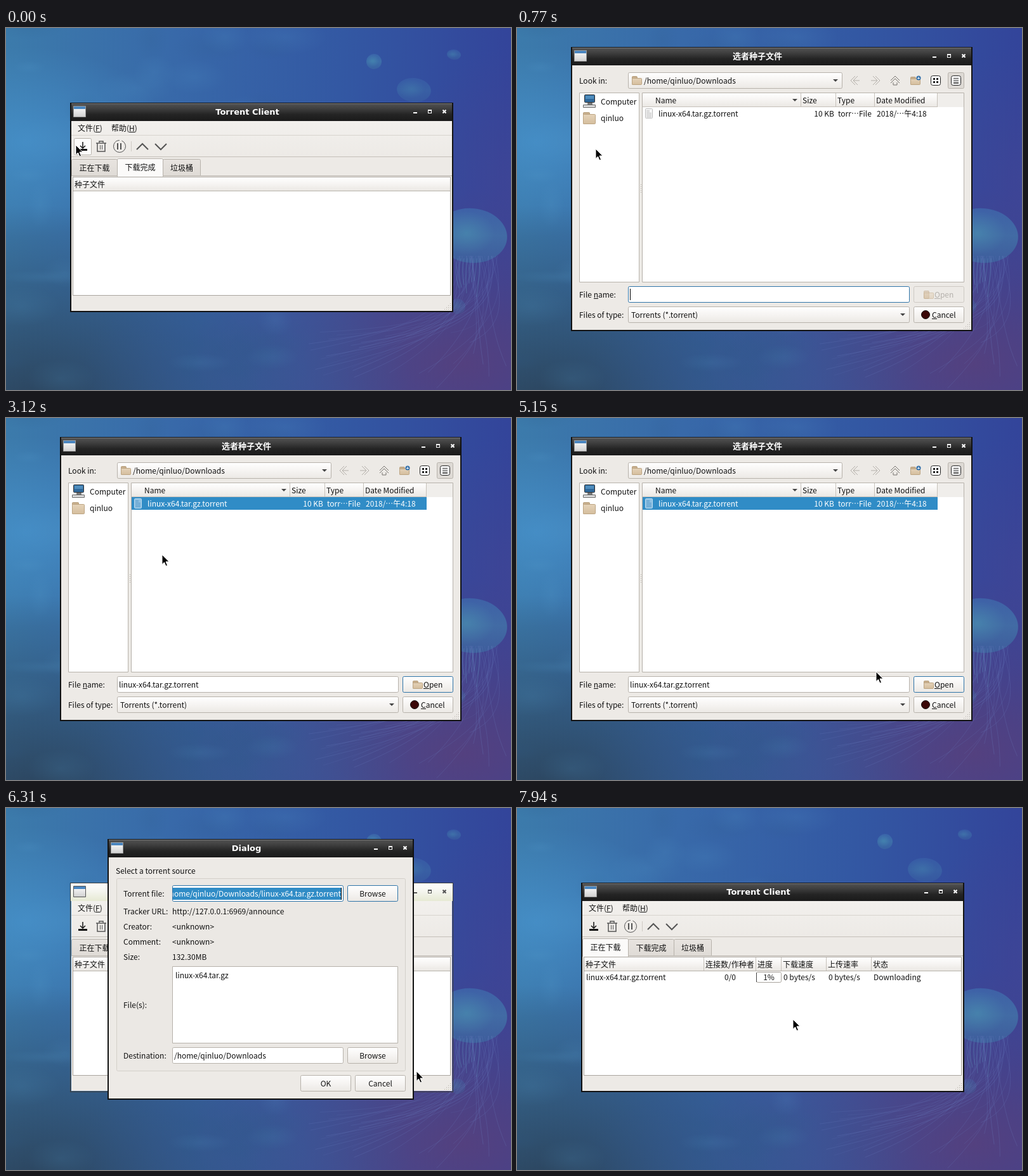
Write an HTML page with a canvas that moves like this. It is 796 by 572 pixels and loops after 8000 ms.

```html
<!DOCTYPE html>
<html lang="zh">
<head>
<meta charset="utf-8">
<title>Torrent Client</title>
<style>
  html, body { margin: 0; width: 100%; height: 100%; overflow: hidden; }
  canvas { display: block; }
</style>
</head>
<body>
<canvas id="stage" width="796" height="572"></canvas>
<script>
const LOOP = 8000, W = 796, H = 572;
const UI_FONT = '12px "Noto Sans CJK SC", sans-serif';
const TITLE_FONT = 'bold 13px "DejaVu Sans", "Noto Sans CJK SC", sans-serif';
const BG = '#edeae6', EDGE = '#b7b2ab', BLUE = '#308cc6', FOCUS = '#2f74a8';
const HOME = '/home/qinluo/Downloads', FILE = 'linux-x64.tar.gz.torrent';
const screen = document.getElementById('stage').getContext('2d');
let ctx = screen;

// ---- drawing helpers ----
function grad(y, h, ...colors) {
  const g = ctx.createLinearGradient(0, y, 0, y + h);
  colors.forEach((c, i) => g.addColorStop(i / (colors.length - 1), c));
  return g;
}
function rect(x, y, w, h, fill) {
  ctx.fillStyle = fill;
  ctx.fillRect(x, y, w, h);
}
function panel(x, y, w, h, fill, edge = EDGE, r = 0) {
  ctx.beginPath();
  ctx.roundRect(x + .5, y + .5, w - 1, h - 1, r);
  ctx.fillStyle = fill;
  ctx.fill();
  ctx.lineWidth = 1;
  ctx.strokeStyle = edge;
  ctx.stroke();
}
function path(points, color, width = 1, fill) {
  ctx.beginPath();
  for (let i = 0; i < points.length; i += 2) ctx.lineTo(points[i], points[i + 1]);
  if (fill) { ctx.closePath(); ctx.fillStyle = fill; ctx.fill(); }
  ctx.lineWidth = width;
  ctx.strokeStyle = color;
  ctx.stroke();
}
// y is the middle of the line; "&" underlines the next letter
function text(s, x, y, color = '#111', align = 'left', font = UI_FONT) {
  const mark = s.indexOf('&'), plain = s.replace('&', '');
  ctx.font = font;
  ctx.textAlign = align;
  ctx.fillStyle = color;
  ctx.fillText(plain, x, y + 5);
  if (mark >= 0) {
    const from = ctx.measureText(plain.slice(0, mark)).width;
    rect(Math.round(x + from), y + 6, Math.round(ctx.measureText(plain[mark]).width), 1, color);
  }
}
function clipped(x, y, w, h, draw) {
  ctx.save();
  ctx.beginPath();
  ctx.rect(x, y, w, h);
  ctx.clip();
  draw();
  ctx.restore();
}
const face = (y, h) => grad(y, h, '#ffffff', '#f6f4f2', '#ebe8e4');
function button(x, y, w, label, edge) {
  panel(x, y, w, 26, face(y, 26), edge, 2);
  text(label, x + w / 2, y + 13, '#111', 'center');
}
function field(x, y, w, edge) { panel(x, y, w, 26, '#fff', edge, 2); }
function combo(x, y, w) {
  panel(x, y, w, 26, face(y, 26), EDGE, 2);
  downArrow(x + w - 11, y + 13);
}
function downArrow(x, y) { path([x - 4, y - 2, x + 4, y - 2, x, y + 2], 'transparent', 1, '#444'); }
function folder(x, y, w, h, alpha = 1) {
  ctx.globalAlpha = alpha;
  panel(x, y, w * .55, h, '#c9b08e', '#b59c7a', 1);
  panel(x, y + 3, w, h - 3, grad(y, h, '#e9d8c0', '#d4bd9c'), '#bca482', 1);
  ctx.globalAlpha = 1;
}
function grip(x, y) {
  for (let r = 0; r < 4; r++)
    for (let c = 0; c <= r; c++) rect(x - c * 3, y - 9 + r * 3, 1, 1, '#b5b0a9');
}

// ---- wallpaper ----
function paintWallpaper() {
  let seed = 7;
  const rnd = () => (seed = seed * 16807 % 2147483647) / 2147483647;
  const glow = (x, y, rx, ry, color, alpha) => {
    ctx.save();
    ctx.translate(x, y);
    ctx.scale(rx, ry);
    const g = ctx.createRadialGradient(0, 0, 0, 0, 0, 1);
    g.addColorStop(0, color);
    g.addColorStop(1, color + '00');
    ctx.globalAlpha = alpha;
    rect(-1, -1, 2, 2, g);
    ctx.restore();
  };
  const base = ctx.createLinearGradient(0, 0, W, 60);
  ['#3c7bab', '#3869a9', '#3358a3', '#33449a'].forEach((c, i) => base.addColorStop(i / 3, c));
  rect(0, 0, W, H, base);
  glow(30, 180, 230, 150, '#4a9ad6', .6);
  glow(40, 610, 440, 330, '#2a3f55', .95);
  glow(720, 530, 430, 280, '#57407c', .9);
  glow(380, 540, 260, 150, '#345a94', .55);
  glow(796, 250, 170, 220, '#444593', .6);
  for (let i = 0; i < 60; i++)
    glow(rnd() * 460, rnd() * H, 20 + rnd() * 60, 10 + rnd() * 30, i % 2 ? '#58a0d0' : '#2d5a88', .13);

  const bell = (x, y, rx, ry, alpha) => {
    ctx.globalAlpha = alpha;
    ctx.beginPath();
    ctx.ellipse(x, y, rx, ry, .1, 0, 7);
    ctx.fillStyle = grad(y - ry, ry * 2, '#3f70b0', '#4380ae', '#3c6aa2');
    ctx.fill();
    ctx.globalAlpha = 1;
    glow(x - rx * .15, y - ry * .1, rx * .8, ry * .8, '#4d9bb4', alpha * .7);
  };
  bell(734, 328, 56, 43, .65);
  bell(580, 53, 12, 12, .6);
  bell(706, 42, 11, 8, .4);
  bell(643, 98, 27, 19, .35);
  bell(712, 440, 12, 12, .25);

  ctx.lineWidth = 1;
  for (let i = 0; i < 30; i++) {
    const x = 700 + rnd() * 75, end = 470 + rnd() * 330;
    ctx.strokeStyle = `rgba(105,125,190,${.1 + rnd() * .2})`;
    ctx.beginPath();
    ctx.moveTo(x, 360);
    ctx.bezierCurveTo(x + rnd() * 40 - 20, 420, x + rnd() * 90 - 50, 470, end, 480 + rnd() * 90);
    ctx.stroke();
  }
  for (let i = 0; i < 8; i++) {
    ctx.strokeStyle = '#5f93bc66';
    ctx.beginPath();
    ctx.moveTo(712 + i * 5, 364);
    ctx.quadraticCurveTo(705 + i * 6, 385, 714 + i * 4, 400 + rnd() * 30);
    ctx.stroke();
  }
}
const wallpaper = document.createElement('canvas');
wallpaper.width = W;
wallpaper.height = H;
ctx = wallpaper.getContext('2d');
paintWallpaper();
ctx = screen;

// ---- window frame ----
function frame(x, y, w, h, title, active = true) {
  const b = active ? 2 : 1, ink = active ? '#fff' : '#555', right = x + w, mid = y + 14;
  ctx.lineWidth = b;
  ctx.strokeStyle = active ? '#121212' : '#3c3e3c';
  ctx.strokeRect(x + b / 2, y + b / 2, w - b, h - b);
  rect(x + b, y + 1, w - 2 * b, 28, active
    ? grad(y, 28, '#555', '#3f3f3f', '#242424', '#1b1b1b') : grad(y, 28, '#fff', '#f4f5ee', '#e7ead5'));
  if (active) rect(x + b, y + 1, w - 2 * b, 1, '#777');
  panel(x + 5, y + 5, 20, 18, grad(y + 5, 18, '#fff', '#cfcfcf'), active ? '#999' : '#555');
  rect(x + 6, y + 6, 18, 4, '#4a86c0');
  text(title, x + w / 2 - 22.5, mid, active ? '#fff' : '#717671', 'center', TITLE_FONT);
  rect(right - 63, mid + 1, 6, 2, ink);
  ctx.strokeStyle = ink;
  ctx.lineWidth = 1;
  ctx.strokeRect(right - 39.5, mid - 2.5, 5, 5);
  rect(right - 40, mid - 3, 6, 2, ink);
  const cx = right - 14;
  path([cx - 2.5, mid - 2.5, cx + 2.5, mid + 2.5], ink, 2);
  path([cx + 2.5, mid - 2.5, cx - 2.5, mid + 2.5], ink, 2);
}

// ---- main window ----
function mainFrame(active) { frame(101, 118, 604, 331, 'Torrent Client', active); }

function mainClient(t) {
  const downloading = t >= 7640, ink = '#555';
  rect(103, 147, 600, 300, BG);
  rect(103, 147, 600, 56, grad(147, 56, '#f2f0ed', '#edeae6'));
  text('文件(&F)', 113, 158);
  text('帮助(&H)', 166, 158);
  rect(103, 169, 600, 1, '#d8d4ce');
  rect(103, 203, 600, 1, '#c5c0b9');

  if (t < 80 || (t >= 310 && t < 690)) panel(107, 174, 28, 27, t >= 540 ? '#dedad5' : '#fdfdfc', EDGE, 2);
  path([121, 180, 121, 189], '#111', 1.5);
  path([117, 186, 121, 190, 125, 186], '#111', 1.5);
  rect(114, 191, 14, 3, '#111');
  path([142, 182, 158, 182], ink, 1.5);
  path([147, 181, 147, 179, 153, 179, 153, 181], ink, 1.5);
  path([144, 182, 144, 195, 156, 195, 156, 182], ink, 1.5);
  path([148.5, 185, 148.5, 192], ink);
  path([151.5, 185, 151.5, 192], ink);
  ctx.beginPath();
  ctx.arc(179, 187, 9.5, -1.2, 4.7);
  ctx.stroke();
  rect(175, 182, 2, 10, ink);
  rect(180, 182, 2, 10, ink);
  rect(197, 179, 1, 16, '#cfcac4');
  path([206, 192, 215, 183, 224, 192], ink, 2);
  path([235, 183, 244, 192, 253, 183], ink, 2);

  const selected = downloading ? 0 : 1;
  rect(103, 233, 600, 1, EDGE);
  [['正在下载', 103, 73], ['下载完成', 175, 73], ['垃圾桶', 247, 60]].forEach(([label, x, w], i) => {
    const on = i === selected, top = on ? 206 : 207;
    panel(x, top, w, 235 - top - (on ? 0 : 1), on ? '#fbfaf9' : grad(207, 27, '#e8e4e0', '#dfdbd6'), EDGE, [2, 2, 0, 0]);
    if (on) rect(x + 1, 233, w - 2, 2, '#fbfaf9');
    text(label, x + w / 2, on ? 220 : 221, '#111', 'center');
  });

  panel(105, 235, 596, 188, '#fff', '#aaa59e');
  rect(106, 236, 594, 21, face(236, 21));
  rect(106, 257, 594, 1, EDGE);
  text('种子文件', 108, 247);
  if (downloading) {
    [['连接数/作种者', 297], ['进度', 379], ['下载速度', 419], ['上传速率', 490], ['状态', 561]].forEach(([label, x]) => {
      rect(x - 3, 236, 1, 21, '#c6c1ba');
      text(label, x, 247);
    });
    const done = t >= 7940;
    text(FILE, 109, 267);
    text('0/0', 336, 267, '#111', 'center');
    panel(377, 259, 40, 17, '#fff', '#a9a49d', 2);
    if (done) rect(377, 260, 1, 15, '#444');
    text(done ? '1%' : '0%', 397, 267, '#111', 'center');
    text('0 bytes/s', 420, 267);
    text('0 bytes/s', 491, 267);
    text('Downloading', 562, 267);
  }
  grip(700, 444);
}

// ---- file chooser ----
function chooserFrame() { frame(85, 30, 633, 449, '选者种子文件'); }

function chooserClient(t) {
  const chosen = t >= 1620, nav = '#b3afa9';
  rect(87, 59, 629, 418, BG);
  text('Look in:', 98, 83);
  combo(175, 70, 338);
  folder(181, 76, 16, 14);
  text(HOME, 200, 83);

  [[533, -1, 0], [565, 1, 0], [596, 0, -1]].forEach(([x, dx, dy]) => {
    const color = dy ? '#77736e' : nav;
    const chevron = k => dy ? [x - 7, 83 + k, x, 76 + k, x + 7, 83 + k]
      : [x - dx * k, 76, x + dx * (7 - k), 83, x - dx * k, 90];
    path(chevron(0), color);
    path(chevron(4), color);
    if (dy) path([x - 3, 86, x - 3, 90, x + 3, 90, x + 3, 86], color);
    else path([x + dx * 3, 83, x - dx * 7, 83], color);
  });
  folder(620, 77, 16, 13);
  ctx.beginPath();
  ctx.arc(633, 79, 3.5, 0, 7);
  ctx.fillStyle = '#2d6ca8';
  ctx.fill();
  rect(631, 79, 4, 1, '#fff');
  rect(632.5, 77, 1, 4, '#fff');
  panel(679, 70, 26, 26, '#dedad5', EDGE, 2);
  [652, 684].forEach(x => panel(x, 75, 16, 16, '#fff', '#222', 3));
  for (const x of [656, 661]) for (const y of [79, 84]) rect(x, y, 3, 3, '#222');
  for (const y of [79, 82, 85, 87]) rect(688, y, 8, 1, '#222');

  panel(98, 102, 95, 300, '#fff');
  panel(106, 105, 17, 13, '#30699b', '#333', 1);
  rect(108, 107, 13, 5, '#4f8dbd');
  rect(111, 118, 8, 3, '#777');
  panel(104, 121, 20, 5, '#ddd', '#666');
  text('Computer', 132, 116);
  folder(104, 133, 20, 19);
  text('qinluo', 132, 142);
  for (let y = 247; y < 260; y += 3) rect(195, y, 1, 1, '#aaa59e');

  panel(197, 102, 508, 300, '#fff');
  rect(198, 103, 506, 22, '#f0eeeb');
  rect(198, 103, 465, 21, face(103, 21));
  rect(198, 124, 465, 1, '#c6c1ba');
  [447, 502, 563, 662].forEach(x => rect(x, 103, 1, 21, '#c6c1ba'));
  [['Name', 218], ['Size', 450], ['Type', 505], ['Date Modified', 566]].forEach(([s, x]) => text(s, x, 114));
  downArrow(438, 114);

  const ink = chosen ? '#fff' : '#111';
  if (chosen) rect(198, 125, 465, 20, BLUE);
  panel(202, 127, 12, 16, chosen ? '#8fc0e2' : '#f7f7f7', chosen ? '#bcdcf0' : '#bbb', 1);
  for (let y = 130; y < 141; y += 2) rect(204, y, y < 133 ? 5 : 8, 1, chosen ? '#5d9fcd' : '#c4c4c4');
  text(FILE, 223, 135, ink);
  text('10 KB', 500, 135, ink, 'right');
  text('torr…File', 506, 135, ink);
  text('2018/…午4:18', 567, 135, ink);

  text('File &name:', 98, 421);
  field(175, 408, 444, chosen ? EDGE : FOCUS);
  if (chosen) text(FILE, 178, 421);
  else if (t < 1290) rect(178, 412, 1, 18, '#000');
  const pressed = t >= 5910 && t < 6070;
  panel(625, 408, 80, 26, pressed ? '#dcd8d3' : chosen ? face(408, 26) : BG, chosen ? FOCUS : '#cdc9c3', 2);
  folder(641, 415, 16, 13, chosen ? 1 : .45);
  text('&Open', 658, 421, chosen ? '#111' : '#b5b1ac');

  text('Files of type:', 98, 453);
  combo(175, 440, 444);
  text('Torrents (*.torrent)', 180, 453);
  button(625, 440, 80, '');
  ctx.beginPath();
  ctx.arc(644, 453, 6.5, 0, 7);
  ctx.fillStyle = '#3a0808';
  ctx.fill();
  ctx.strokeStyle = '#111';
  ctx.stroke();
  text('&Cancel', 654, 453);
  grip(713, 474);
}

// ---- torrent dialog ----
function dialogFrame() { frame(160, 49, 483, 412, 'Dialog'); }

function dialogClient(t) {
  const confirmed = t >= 7320;
  rect(162, 78, 479, 381, BG);
  text('Select a torrent source', 173, 99);
  panel(174, 111, 456, 305, '#ebe8e4', '#d4d0ca', 2);
  [['Torrent file:', 135], ['Tracker URL:', 163, 'http://127.0.0.1:6969/announce'], ['Creator:', 187, '<unknown>'],
   ['Comment:', 211, '<unknown>'], ['Size:', 235, '132.30MB'], ['File(s):', 311], ['Destination:', 391]
  ].forEach(([label, y, value = '']) => {
    text(label, 185, y);
    text(value, 262, y);
  });

  field(262, 122, 270, confirmed ? EDGE : FOCUS);
  clipped(263, 123, 268, 24, () => {
    if (!confirmed) rect(263, 126, 265, 19, BLUE);
    text(HOME + '/' + FILE, 528, 135, confirmed ? '#111' : '#fff', 'right');
    if (!confirmed && Math.floor((t - 6310) / 520) % 2 === 0) rect(528, 126, 1, 19, '#000');
  });
  button(538, 122, 80, 'Browse', confirmed ? EDGE : FOCUS);
  panel(262, 250, 356, 122, '#fff');
  text('linux-x64.tar.gz', 267, 264);
  field(262, 378, 270);
  text(HOME, 265, 391);
  button(538, 378, 80, 'Browse');
  button(464, 422, 80, 'OK', confirmed ? FOCUS : EDGE);
  button(550, 422, 80, 'Cancel');
}

// ---- pointer: first step, last step, steps, x, y ----
const moves = [
  [80, 80, 1, 104, 185], [230, 390, 3, 116, 190], [540, 540, 1, 124, 191],
  [930, 1470, 8, 285, 133], [1550, 1700, 3, 279, 131], [1790, 2410, 9, 654, 423],
  [2570, 2570, 1, 657, 421], [2890, 3120, 4, 246, 216], [3820, 4050, 4, 512, 336],
  [5150, 5150, 1, 566, 401], [5220, 5220, 1, 574, 404], [5390, 5530, 3, 648, 412],
  [5680, 5760, 2, 647, 416], [6620, 7150, 8, 487, 428], [7640, 7790, 3, 435, 334]
];
function pointer(t) {
  let x = 110, y = 185;
  for (const [from, to, steps, nx, ny] of moves) {
    if (t < from) break;
    const step = Math.floor((t - from) / (to - from || 1) * (steps - 1) + 1e-6) + 1;
    const f = Math.min(1, step / steps);
    x += (nx - x) * f;
    y += (ny - y) * f;
  }
  ctx.save();
  ctx.translate(Math.round(x), Math.round(y));
  path([0, 0, 0, 15.5, 3.5, 12, 6, 18, 8.5, 17, 6, 11, 11, 11], '#fff', 1, '#000');
  ctx.restore();
}

function draw(t) {
  ctx.drawImage(wallpaper, 0, 0);
  if (t < 770) {
    mainFrame(true);
    mainClient(t);
    if (t >= 690) chooserFrame();
  } else if (t < 6070) {
    chooserFrame();
    chooserClient(t);
  } else if (t < 7470) {
    mainFrame(false);
    // uncovered area keeps the old pixels until it is repainted
    if (t < 6160) clipped(102, 147, 602, 300, () => chooserClient(t));
    else mainClient(t);
    if (t >= 6230) dialogFrame();
    if (t >= 6310) dialogClient(t);
  } else {
    mainFrame(true);
    mainClient(t);
    if (t < 7640) clipped(103, 147, 600, 300, () => { dialogFrame(); dialogClient(t); });
  }
  pointer(t);
}

const start = performance.now();
(function tick() {
  draw((performance.now() - start) % LOOP);
  requestAnimationFrame(tick);
})();
</script>
</body>
</html>
```
